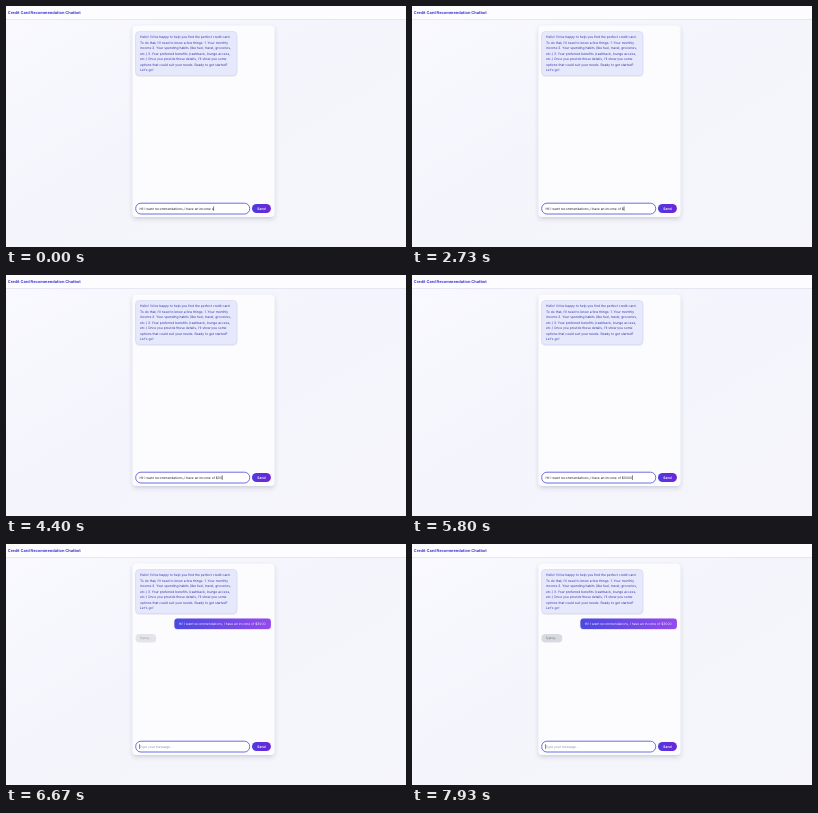
An HTML page that plays this animation: 400 by 241 pixels, repeating every 8 s.

```html
<!DOCTYPE html>
<html lang="en">
<head>
<meta charset="utf-8">
<title>Credit Card Recommendation Chatbot</title>
<style>
  html, body { margin: 0; width: 100%; height: 100%; overflow: hidden; background: #f5f6fc; }
  svg { display: block; width: 100%; height: 100%; }
  text { font: 3.29px Inter, "Open Sans", sans-serif; text-rendering: geometricPrecision; white-space: pre; }
  #title { font-size: 3.95px; font-weight: 700; fill: #3f35cf; }
  #greeting text { fill: #3a34a8; }
  #send { font-size: 3.4px; font-weight: 600; fill: #fff; text-anchor: middle; }
  #typing text { font-size: 2.98px; fill: #62656f; }
  #hint { fill: #8c90a0; }
</style>
</head>
<body>
<svg viewBox="0 0 400 241">
  <defs>
    <linearGradient id="page" x1="0" y1="0" x2="1" y2="1">
      <stop offset="0" stop-color="#f9f9ff"/>
      <stop offset=".45" stop-color="#f4f5fc"/>
      <stop offset="1" stop-color="#f5f5fb"/>
    </linearGradient>
    <linearGradient id="button">
      <stop offset="0" stop-color="#4f3be0"/>
      <stop offset="1" stop-color="#6d25d6"/>
    </linearGradient>
    <linearGradient id="mine">
      <stop offset="0" stop-color="#4c48e2"/>
      <stop offset="1" stop-color="#9549ee"/>
    </linearGradient>
    <filter id="shadow" x="-20%" y="-20%" width="140%" height="140%">
      <feDropShadow dx="0" dy="2" stdDeviation="2" flood-color="#33375a" flood-opacity=".2"/>
    </filter>
    <filter id="soft" x="-20%" y="-40%" width="140%" height="200%">
      <feDropShadow dx="0" dy=".6" stdDeviation=".6" flood-color="#33375a" flood-opacity=".2"/>
    </filter>
  </defs>

  <rect width="400" height="241" fill="url(#page)"/>
  <rect width="400" height="13.4" fill="#fdfdff"/>
  <rect y="13.2" width="400" height=".6" fill="#d9daea"/>
  <text id="title" x="1.8" y="8.3">Credit Card Recommendation Chatbot</text>

  <rect x="126.6" y="19.8" width="141.8" height="191.2" rx="4" fill="#fcfcff" filter="url(#shadow)"/>

  <g id="greeting">
    <rect x="129.6" y="25.6" width="101.4" height="43.8" rx="3.6" fill="#e6e8fc" stroke="#cfd3f4" stroke-width=".5" filter="url(#soft)"/>
  </g>

  <g id="reply">
    <rect x="168.4" y="74.5" width="96.5" height="10.5" rx="3" fill="url(#mine)" filter="url(#soft)"/>
    <text id="sent" x="172.8" y="80.9" fill="#f1efff"></text>
    <g id="typing">
      <rect x="129.5" y="90" width="20.8" height="8.6" rx="4" fill="#d9dae1"/>
      <text x="133.4" y="95.4">Typing...</text>
    </g>
  </g>

  <rect x="129.7" y="197.2" width="114" height="10.8" rx="5.2" fill="#fff" stroke="#5b5fdc" stroke-width=".9"/>
  <text id="hint" x="133.4" y="203.8">Type your message...</text>
  <text id="draft" x="133.4" y="203.8" fill="#20222c"></text>
  <rect id="caret" y="200.3" width=".5" height="4.6" fill="#111"/>
  <rect x="246" y="198" width="18.9" height="9.1" rx="4.5" fill="url(#button)"/>
  <text id="send" x="255.4" y="203.8">Send</text>
</svg>
<script>
  const LOOP = 8000, SEND = 6070, REFOCUS = 6470;
  const MESSAGE = "Hi! I want recommendations, I have an income of $3000";
  const KEYS = [0, 800, 1670, 2730, 3270, 4200, 4870, 5530];
  const FIRST = MESSAGE.length - KEYS.length + 1;
  const GREETING = [
    "Hello! I'd be happy to help you find the perfect credit card.",
    "To do that, I'll need to know a few things: 1. Your monthly",
    "income 2. Your spending habits (like fuel, travel, groceries,",
    "etc.) 3. Your preferred benefits (cashback, lounge access,",
    "etc.) Once you provide these details, I'll show you some",
    "options that could suit your needs. Ready to get started?",
    "Let's go!"
  ];
  const $ = id => document.getElementById(id);
  const show = (id, on) => $(id).setAttribute("visibility", on ? "visible" : "hidden");

  GREETING.forEach((line, i) => {
    const t = document.createElementNS("http://www.w3.org/2000/svg", "text");
    t.setAttribute("x", 134);
    t.setAttribute("y", 32.1 + i * 5.53);
    t.textContent = line;
    $("greeting").append(t);
  });
  $("sent").textContent = MESSAGE;

  // Two-second pulse between full and half opacity
  const pulse = ms => 0.75 + 0.25 * Math.cos(ms / 1000 * Math.PI);

  function draw(t) {
    const sent = t >= SEND;
    const typed = KEYS.filter(k => k <= t).length;
    const text = sent ? "" : MESSAGE.slice(0, FIRST + typed - 1);
    const draft = $("draft");
    if (draft.textContent !== text) draft.textContent = text;
    show("hint", sent);
    show("reply", sent);
    $("typing").setAttribute("opacity", sent ? pulse(t - SEND) : 1);

    const last = sent ? (t < REFOCUS ? SEND : REFOCUS) : KEYS[typed - 1];
    const width = text ? draft.getComputedTextLength() : 0;
    $("caret").setAttribute("x", 133.3 + width);
    show("caret", (t - last) % 1000 < 500);
  }

  function tick() {
    draw(performance.now() % LOOP);
    requestAnimationFrame(tick);
  }
  tick();
</script>
</body>
</html>
```
